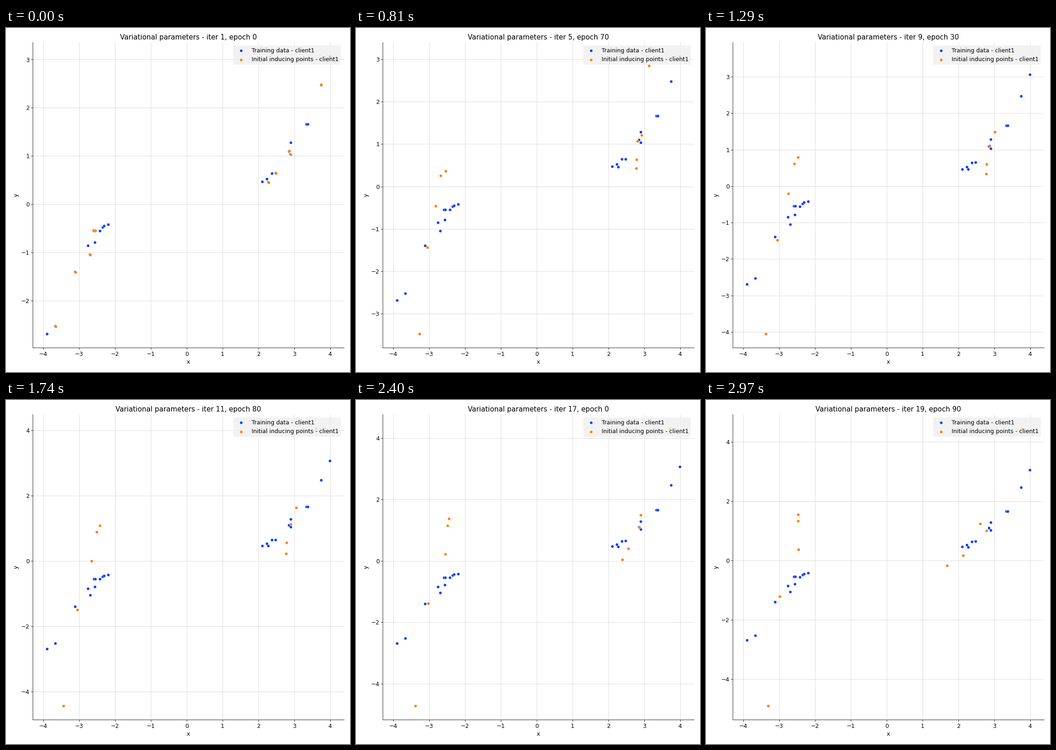
A matplotlib script for the animation above (3 s loop, 748 by 748 pixels).

```python
import numpy as np
import matplotlib.pyplot as plt
from matplotlib.animation import FuncAnimation

SIZE, DPI = 748, 75
FRAMES, INTERVAL = 100, 30
BLUE, ORANGE = "#023eff", "#ff7c00"
STEP = 0.01  # size of the first optimiser step

plt.rcParams["font.family"] = "DejaVu Sans"
plt.rcParams["font.size"] = 12

train = np.array([
    (-3.90, -2.685), (-3.665, -2.52), (-3.12, -1.395), (-2.695, -1.045),
    (-2.76, -0.85), (-2.57, -0.785), (-2.59, -0.545), (-2.55, -0.545),
    (-2.43, -0.55), (-2.35, -0.475), (-2.31, -0.445), (-2.19, -0.42),
    (2.105, 0.47), (2.235, 0.53), (2.275, 0.46), (2.38, 0.645),
    (2.48, 0.65), (2.85, 1.10), (2.90, 1.285), (2.905, 1.035),
    (3.34, 1.66), (3.375, 1.66), (3.755, 2.475), (3.99, 3.065),
])

# Each inducing point leaves a training point and passes three waypoints
times = np.array([0, 16, 58, 99])
paths = {
    1: [(-3.24, -3.08), (-3.44, -4.44), (-3.31, -4.90)],
    2: [(-3.05, -1.42), (-3.06, -1.49), (-2.99, -1.20)],
    3: [(-2.84, -0.66), (-2.66, 0.00), (-2.47, 0.37)],
    7: [(-2.57, 0.04), (-2.43, 1.09), (-2.48, 1.55)],
    6: [(-2.72, -0.03), (-2.51, 0.89), (-2.48, 1.33)],
    14: [(2.77, 0.45), (2.77, 0.23), (1.68, -0.17)],
    16: [(2.79, 0.64), (2.79, 0.56), (2.13, 0.18)],
    19: [(2.80, 1.05), (2.90, 1.13), (2.79, 1.01)],
    17: [(2.88, 1.12), (3.06, 1.63), (2.61, 1.25)],
    22: [(3.05, 2.57), (3.61, 4.06), (3.76, 4.46)],
}
origin = train[list(paths)]
way = np.array(list(paths.values())).swapaxes(0, 1)
poses = np.concatenate([[origin + STEP * np.sign(way[0] - origin)], way])


def tangents(t, p):
    """Monotone cubic slopes, flat where a coordinate turns back."""
    d = np.diff(p, axis=0) / np.diff(t)[:, None, None]
    a, b = d[:-1], d[1:]
    same = a * b > 0
    m = np.zeros_like(p)
    m[1:-1] = np.where(same, 2 * a * b / np.where(same, a + b, 1), 0)
    m[0] = 1.5 * d[0] - 0.5 * m[1]
    m[-1] = 1.5 * d[-1] - 0.5 * m[-2]
    return m


slopes = tangents(times, poses)


def inducing(k):
    i = min(np.searchsorted(times, k, side="right") - 1, len(times) - 2)
    h = times[i + 1] - times[i]
    s = (k - times[i]) / h
    r = 1 - s
    return ((1 + 2 * s) * r**2 * poses[i] + (1 + 2 * r) * s**2 * poses[i + 1]
            + h * s * r * (r * slopes[i] - s * slopes[i + 1]))


def padded(values, margin=0.05):
    lo, hi = values.min(), values.max()
    pad = margin * (hi - lo)
    return lo - pad, hi + pad


# A hair over the exact size guards against rounding down a pixel
fig = plt.figure(figsize=((SIZE + 0.01) / DPI,) * 2, dpi=DPI, facecolor="white")
left, right, top, bottom = 58.4, 734.5, 31.5, 695.4
ax = fig.add_axes([left / SIZE, 1 - bottom / SIZE,
                   (right - left) / SIZE, (bottom - top) / SIZE])
ax.spines[["top", "right"]].set_visible(False)
ax.set_axisbelow(True)
ax.grid(alpha=0.5)
ax.set_xlabel("x")
ax.set_ylabel("y")
ax.set_xlim(padded(train[:, 0]))


def dots(points, color, label):
    return ax.scatter(*points.T, s=36, color=color, edgecolor="white",
                      linewidth=0.48, label=label)


dots(train, BLUE, "Training data - client1")
moving = dots(poses[0], ORANGE, "Initial inducing points - client1")
ax.legend(loc="upper right", facecolor="#efefef", edgecolor="none", framealpha=0.8)
title = ax.set_title("")


def update(k):
    points = inducing(k)
    moving.set_offsets(points)
    ax.set_ylim(padded(np.concatenate([train[:, 1], points[:, 1]])))
    title.set_text(f"Variational parameters - iter {1 + 2 * (k // 10)}, epoch {k % 10 * 10}")
    return moving, title


anim = FuncAnimation(fig, update, frames=FRAMES, init_func=lambda: update(0),
                     interval=INTERVAL, repeat=True, repeat_delay=0, blit=False)
plt.show()
```
